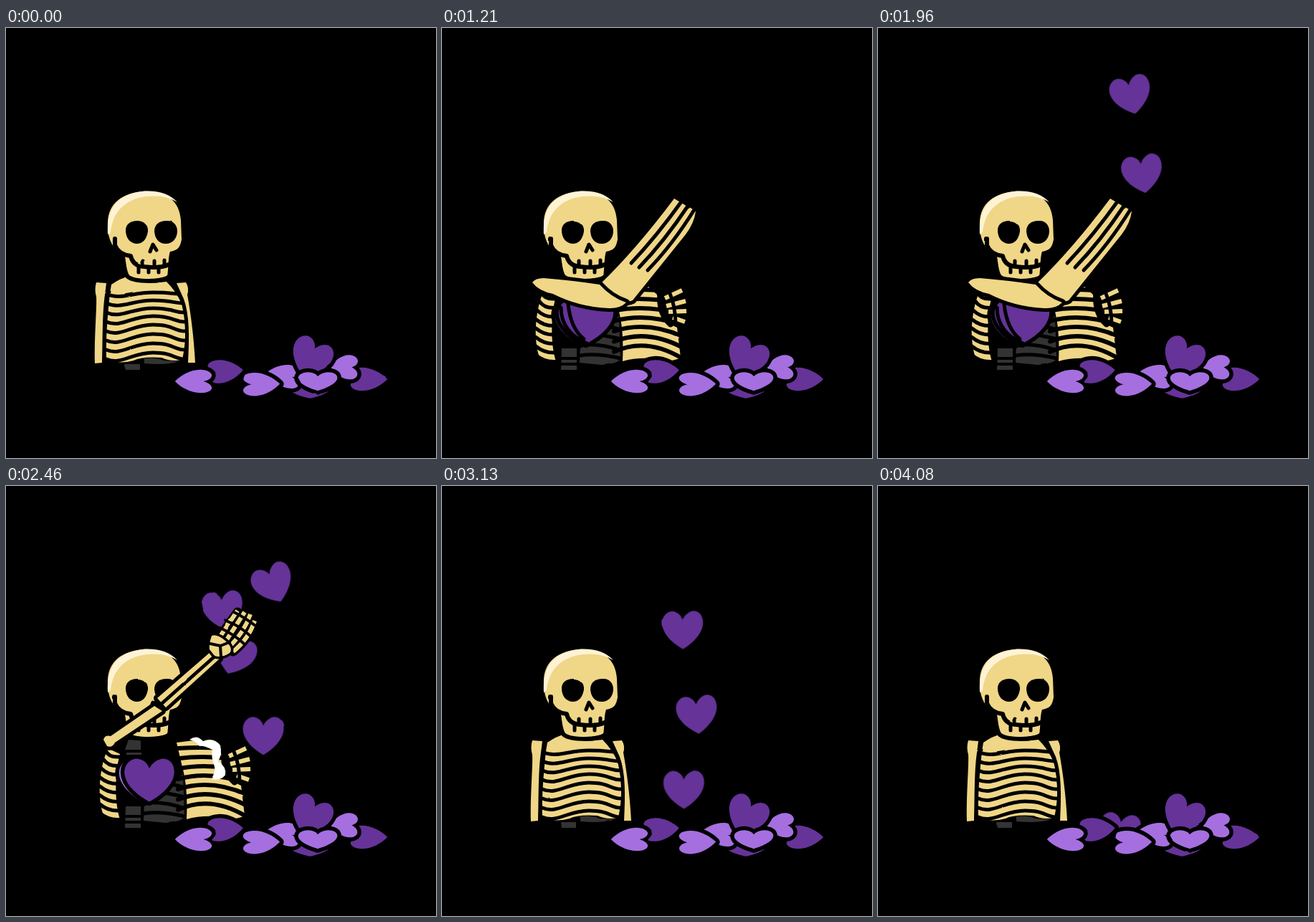
These frames come from a looping animation (600 by 600 pixels, 4.12 s). An HTML page:

```html
<!DOCTYPE html>
<html lang="en">
<head>
<meta charset="utf-8">
<title>Skeleton tossing hearts</title>
<style>
html, body { margin: 0; width: 100%; height: 100%; overflow: hidden; background: #000; }
svg { display: block; width: 100vw; height: 100vh; }
.bone { fill: #f0d687; stroke: #000; stroke-width: 10; stroke-linejoin: round; paint-order: stroke; }
.flat { fill: #f0d687; }
.ink { fill: none; stroke: #000; stroke-width: 5; stroke-linecap: round; stroke-linejoin: round; }
.bold { stroke-width: 6; }
.fine { stroke-width: 4; }
.thick { stroke-width: 9; }
.stick { fill: none; stroke: #f0d687; stroke-width: 6; }
.wire { stroke-width: 4; }
.dim { fill: #333; }
.dark { fill: #663399; }
.light { fill: #a56fe0; }
.rim { stroke: #000; stroke-width: 11; stroke-linejoin: round; paint-order: stroke; }
</style>
</head>
<body>
<svg viewBox="0 0 600 600">
  <defs>
    <path id="heart" vector-effect="non-scaling-stroke" d="M0 27C-14 19-28 6-28.500-9C-28.500-20-21-26-14-26C-6-25-2-20 0-14C3-20 8-25 15-26C23-26 28.500-20 28.500-10C28.500 5 14 19 0 27Z"/>
    <clipPath id="ground"><path d="M0 0H600V479H0Z"/></clipPath>
    <filter id="rough1" filterUnits="userSpaceOnUse" x="0" y="0" width="600" height="600" color-interpolation-filters="sRGB">
      <feTurbulence type="fractalNoise" baseFrequency=".05" numOctaves="1" seed="3"/>
      <feDisplacementMap in="SourceGraphic" scale="2" xChannelSelector="R" yChannelSelector="G"/>
    </filter>
    <filter id="rough2" filterUnits="userSpaceOnUse" x="0" y="0" width="600" height="600" color-interpolation-filters="sRGB">
      <feTurbulence type="fractalNoise" baseFrequency=".05" numOctaves="1" seed="8"/>
      <feDisplacementMap in="SourceGraphic" scale="2" xChannelSelector="R" yChannelSelector="G"/>
    </filter>
  </defs>
  <g id="stage">
    <g id="flying" clip-path="url(#ground)"></g>

    <g id="closed">
      <path class="dim" d="M166 469H187V477H167Z"/>
      <path class="flat" d="M147 358Q160 349 172 346Q200 357 224 354Q238 368 245 385C253 410 251 440 246 463Q230 466 217 460Q190 458 178 464Q160 469 140 464C139 430 142 400 145 370Z"/>
      <path id="ribsClosed" class="ink"/>
      <path class="bone" d="M126 355L140 356L138 372C134 400 135 440 134 467L124 468C123 430 127 390 126 375Q123 365 126 355Z"/>
      <path class="bone" d="M238 356L251 355Q256 363 253 372C258 400 262 430 264 467L254 467C256 430 256 400 248 378Z"/>
      <path class="dim" d="M193 461Q208 459 220 464L242 465Q224 471 193 468Z"/>
    </g>

    <g id="wide">
      <path class="dim" d="M193 441L222 424L247 402L249 462Q243 469 222 470L192 467Z"/>
      <path class="ink" d="M224 414L250 421M216 427L250 434M196 442Q222 440 250 450M192 457Q215 453 250 461"/>
      <path class="flat" d="M238 358L262 355Q275 364 288 361L300 372Q303 400 316 412L328 418L333 460Q315 469 290 461Q270 460 252 465Q254 420 246 392Z"/>
      <path id="ribsWide" class="ink bold"/>
      <path class="ink thick" d="M305 374Q303 398 319 413"/>
      <path class="stick" d="M311 377L335 366M313 388L340 381M316 396L341 395M322 404L339 410"/>
      <path class="ink" d="M317 368Q326 388 326 414"/>
    </g>

    <g id="core">
      <path class="dim" d="M171 354L188 355V368H166ZM168 372H189V375H168ZM167 447H188V477H166Z"/>
      <path class="ink fine" d="M164 461H190M166 469H190"/>
      <path class="flat" d="M142 366L159 374C152 400 151 440 159 465Q148 467 137 462C128 440 128 400 142 366Z"/>
      <path id="ribsLeft" class="ink"/>
      <use href="#heart" class="light rim" transform="translate(192 411) scale(1.2 1.13)"/>
      <use href="#heart" class="dark rim" transform="translate(200 410) scale(1.22 1.13)"/>
    </g>

    <g id="stack">
      <use href="#heart" class="dark rim" transform="translate(201 409) scale(1.34 1.17)"/>
      <path class="ink" d="M166 390Q166 424 202 440M176 386Q180 420 198 434"/>
    </g>

    <g id="puff">
      <path fill="#fff" d="M256 354Q266 346 275 356Q290 350 299 362Q302 374 296 384Q308 392 306 403Q300 412 286 409Q294 398 290 388Q286 378 288 368Q276 362 270 363Q264 355 256 354Z"/>
    </g>

    <g id="narrow">
      <path class="flat" d="M147 360Q160 348 172 348L163 374Q154 369 147 360Z"/>
      <path class="bone" d="M204 375Q202 355 224 350Q244 353 253 372Q263 392 263 412L263 464Q248 469 226 462Q210 470 199 464L201 385Z"/>
      <path class="ink bold" d="M204 377Q218 387 236 378T260 383M204 388Q228 398 260 394M240 402Q258 398 266 410M200 444Q225 442 236 438T266 445M200 456Q222 456 236 450T266 457M200 466Q218 467 236 460T266 466"/>
      <path class="bone" d="M263 421L306 455L293 457Q276 449 262 440Z"/>
      <path class="ink" d="M265 430L294 451"/>
      <path class="ink thick" d="M192 393L240 394V436L195 438L188 414V420L206 405V428L226 405V428"/>
      <path class="stick" style="stroke-width:8" d="M192 395Q215 389 240 397M187 408L242 409M187 419L242 420M191 432Q216 437 240 430"/>
      <path class="ink" d="M203 390V440M219 390V440M239 395V436"/>
    </g>

    <g id="hanging">
      <path class="bone" d="M119 359Q126 353 134 359L133 372Q122 420 111 456L102 458Q105 430 115 378Q117 366 119 359Z"/>
      <path class="stick wire" d="M102 461L110 464M114 466L132 479"/>
    </g>

    <g id="head">
      <path class="flat" d="M142 276C141 250 155 232 190 228C222 226 242 240 244 268L245 295C243 306 240 310 229 312C226 320 227 335 225 347Q200 353 175 349C168 342 168 330 166 319C154 313 142 300 142 276Z"/>
      <path fill="#fff3d6" d="M142 288C140 252 155 232 190 228C212 226 229 232 239 243C228 236 214 233 196 235C166 239 149 256 146 285Z"/>
      <path d="M167 284C166 274 174 269 183 269C192 269 199 275 198 284C196 295 191 301 182 301C173 300 168 294 167 284ZM207 284C207 274 214 269 224 269C232 268 239 274 239 283C239 294 232 301 223 301C213 301 208 294 207 284Z"/>
      <path class="ink" d="M201 312L205 302L210 310"/>
      <path class="ink bold" d="M152 294V303Q157 316 174 318Q177 332 193 333Q215 336 227 330"/>
      <path class="ink" d="M191 325V333M207 325V333M221 324V331M185 333V341M199 334V341M213 333V341"/>
      <path class="ink bold" d="M170 347Q177 353 200 353Q220 353 228 347"/>
    </g>

    <g id="reach">
      <path class="bone" d="M126 353Q136 349 139 358L132 372L86 413Q70 417 68 403Q70 396 80 393Z"/>
      <path class="bone" d="M79 398L166 393L168 410L80 414Z"/>
      <path class="ink" d="M88 406L166 402"/>
      <path class="bone" d="M167 392Q188 386 210 398L212 424Q190 430 170 416Z"/>
      <path class="ink" d="M178 400L211 406M176 410L211 415M190 392L188 424M202 394L201 426"/>
    </g>

    <g id="swing">
      <path class="bone" d="M324 238L354 256Q352 272 340 288L266 380Q250 388 220 358Q270 310 324 238Z"/>
      <path class="ink" d="M335 241Q300 290 264 328M344 247Q310 298 275 334M353 252Q322 302 287 338"/>
      <path class="bone" d="M126 355Q130 349 142 349Q180 352 220 358Q236 376 257 383Q248 392 232 391Q190 389 155 371Q135 367 126 355Z"/>
    </g>

    <g id="toss">
      <path class="bone" d="M136 354Q138 347 146 349L207 307L218 314L152 358Q148 366 141 363Z"/>
      <path class="bone" d="M211 296L286 231L298 241L223 309Z"/>
      <path class="ink" d="M218 303L292 237M209 301L219 309"/>
      <path class="ink" style="stroke-width:13" d="M298 211L323 176M307 216L333 178M314 222Q332 204 341 182M317 231Q339 213 345 191"/>
      <path class="stick" d="M298 211L323 174M307 216L333 176M314 222Q332 204 341 179M317 231Q339 213 347 188"/>
      <path class="ink fine" d="M299 198Q318 207 332 220M306 187Q326 195 342 210M318 176Q334 184 348 195"/>
      <path class="bone" style="stroke-width:7" d="M287 209Q283 220 284 228L291 237Q302 240 312 233Q318 226 305 215Q294 206 287 209Z"/>
      <path class="ink fine" d="M285 220L299 223L312 218M299 223L300 239"/>
    </g>

    <g id="pile"></g>
  </g>
</svg>
<script>
const LOOP = 4120;
const BEAT = LOOP / 11;
const $ = id => document.getElementById(id);
const run = (el, frames) => el.animate(frames, { duration: LOOP, iterations: Infinity });

function addHeart(parent, cls) {
  const el = document.createElementNS('http://www.w3.org/2000/svg', 'use');
  el.setAttribute('href', '#heart');
  el.setAttribute('class', cls);
  return parent.appendChild(el);
}

function ribs(id, count, line) {
  $(id).setAttribute('d', Array.from({ length: count }, (_, i) => line(i)).join(''));
}
ribs('ribsClosed', 8, i => {
  const y = 371 + 13 * i;
  const lift = Math.min(2 + i * 2, 9);
  return `M140 ${y}C160 ${y + 9} 175 ${y - lift} 205 ${y - lift}S235 ${y + 1} 251 ${y}`;
});
ribs('ribsWide', 7, i => {
  const y = 366 + 14.3 * i;
  return `M240 ${y}Q285 ${y - 3 - 3 * i} 335 ${y + 3 + i}`;
});
ribs('ribsLeft', 8, i => {
  const y = 369 + 12.5 * i;
  return `M${Math.max(131, 139 - 3 * i)} ${y}Q143 ${y + 10} 158 ${y + 9}`;
});

// x, y, turn, width scale, length scale, colour
[
  [424, 507, 0, .97, .36, 'dark'],
  [306, 479, -94, .57, .92, 'dark'],
  [262, 493, 90, .57, .97, 'light'],
  [387, 485, 100, .57, .88, 'light'],
  [356, 497, -91, .57, .97, 'light'],
  [506, 490, -90, .57, .97, 'dark'],
  [472, 473, 92, .6, .72, 'light'],
  [425, 460, 25, 1, 1, 'dark'],
  [435, 493, 0, .96, .49, 'light']
].forEach(([x, y, turn, w, h, tone]) => addHeart($('pile'), tone + ' rim')
  .setAttribute('transform', `translate(${x} ${y}) rotate(${turn}) scale(${w} ${h})`));

// Show an element only inside the given [start, end) spans.
function show(id, ...spans) {
  const key = (t, on) => ({ offset: t / LOOP, visibility: on ? 'visible' : 'hidden', easing: 'step-end' });
  const first = spans[0][0] === 0;
  const keys = [key(0, first)];
  for (const [start, end] of spans) {
    if (start > 0) keys.push(key(start, true));
    if (end < LOOP) keys.push(key(end, false));
  }
  keys.push(key(LOOP, spans[spans.length - 1][1] === LOOP));
  run($(id), keys);
}

const beats = [3, 4, 5, 6].map(n => n * BEAT);
const swings = beats.map(t => [t + 60, t + 150]);
const tosses = beats.map(t => [t + 150, t + 265]);
const reaches = [[1150, beats[0] + 60],
  ...beats.slice(0, 3).map(t => [t + 265, t + BEAT + 60]), [beats[3] + 265, 2560]];

show('closed', [0, 760], [2960, LOOP]);
show('core', [760, 2960]);
show('wide', [1000, 2750]);
show('narrow', [760, 1000], [2750, 2960]);
show('hanging', [760, 1150], [2560, 2960]);
show('reach', ...reaches);
show('swing', ...swings);
show('stack', ...swings);
show('toss', ...tosses);
show('puff', ...tosses);

// Each flight: release time, then later points as [time, x, y, turn].
const flights = [
  [1336, [1710, 370, 134, -20], [1960, 369, 203, -9], [2460, 359, 348, 0], [2830, 388, 433, -18], [3130, 374, 520, 5]],
  [1711, [1960, 353, 93, -13], [2200, 346, 163, 4], [2460, 319, 236, 20], [2830, 326, 335, 8], [3460, 350, 520, -10]],
  [2085, [2460, 373, 136, -23], [2830, 332, 237, 11], [3460, 382, 408, -24], [3840, 374, 520, 0]],
  [2460, [2830, 365, 116, -23], [3460, 304, 293, 23], [4080, 337, 482, 8], [4119, 338, 520, 8]]
];
for (const [t, ...later] of flights) {
  const points = [[t - 40, 280, 222, 8], [t, 302, 174, -6], [t + 80, 329, 98, -9], [t + 160, 343, 75, -11], ...later];
  const pose = ([, x, y, turn]) => `translate(${x}px, ${y}px) rotate(${turn}deg)`;
  const last = points[points.length - 1];
  const el = addHeart($('flying'), 'dark');
  run(el, [
    { offset: 0, transform: pose(points[0]) },
    ...points.map(p => ({ offset: p[0] / LOOP, transform: pose(p) })),
    { offset: 1, transform: pose(last) }
  ]);
  run(el, [
    { offset: 0, visibility: 'hidden', easing: 'step-end' },
    { offset: points[0][0] / LOOP, visibility: 'visible', easing: 'step-end' },
    { offset: last[0] / LOOP, visibility: 'hidden', easing: 'step-end' },
    { offset: 1, visibility: 'hidden' }
  ]);
}

// Wobbling hand-drawn edges
$('stage').animate([
  { filter: 'url(#rough1)', easing: 'step-end' },
  { offset: .5, filter: 'url(#rough2)', easing: 'step-end' },
  { filter: 'url(#rough1)' }
], { duration: BEAT * 2 / 3, iterations: Infinity });
</script>
</body>
</html>
```
